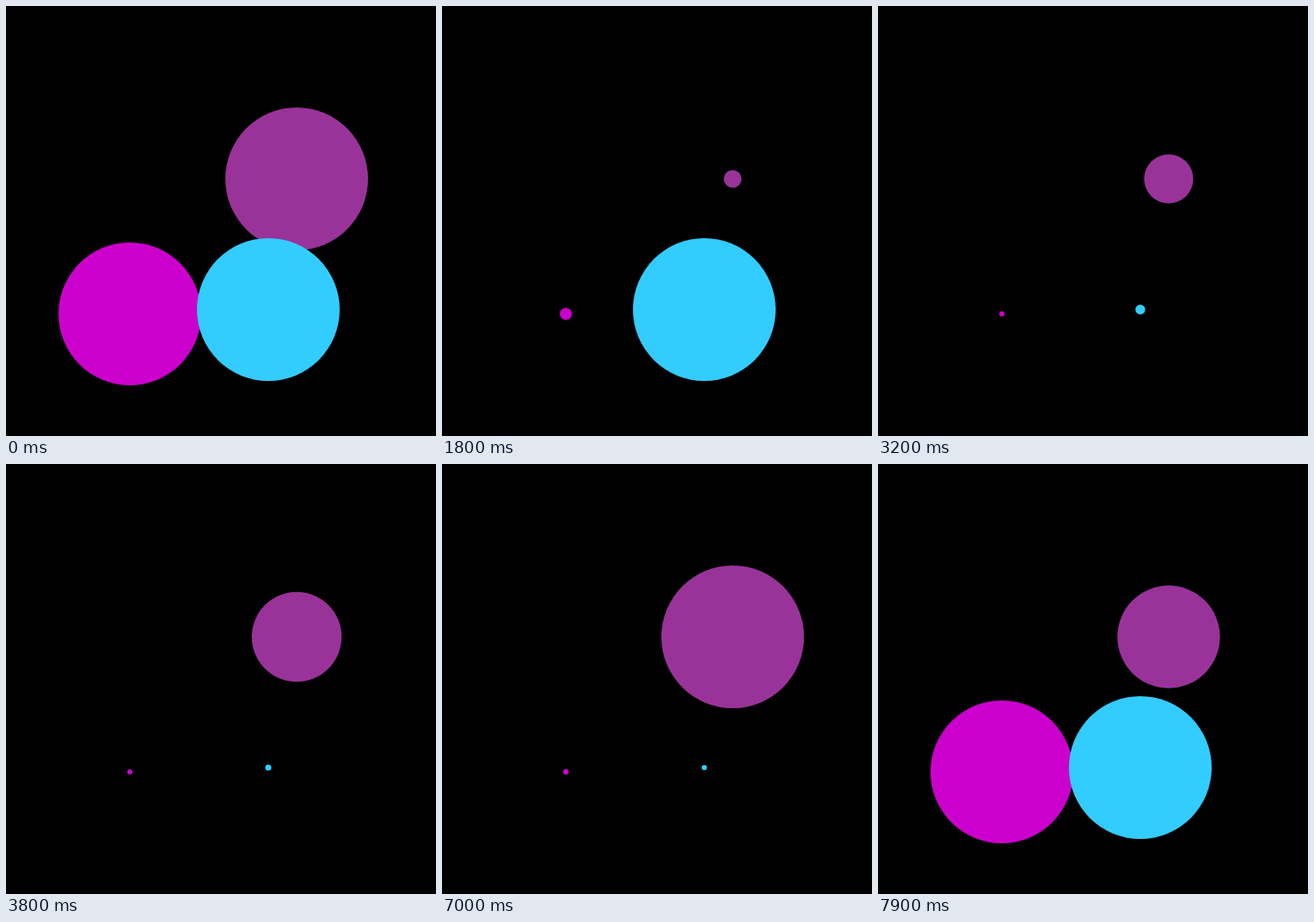
An HTML page with a canvas that plays this animation: 500 by 500 pixels, repeating every 8 s.

```html
<!DOCTYPE html>
<html lang="en">
<head>
<meta charset="utf-8">
<title>Three circles</title>
<style>
  html, body { margin: 0; width: 100%; height: 100%; overflow: hidden; background: #000; }
  canvas { display: block; width: 500px; height: 500px; }
</style>
</head>
<body>
<canvas id="stage" width="500" height="500"></canvas>
<script>
const ctx = document.getElementById('stage').getContext('2d');
const LOOP = 8000, STEP = 100;
const MIN = 3, MAX = 83;

// Times are in steps of 100 ms.
const decay = (t, start, rate) =>
  MIN + (MAX - MIN) * Math.exp(-rate * Math.max(0, t - start));

const swell = (t, start, length, from = MIN) => {
  const u = Math.min(1, Math.max(0, (t - start) / length));
  return from + (MAX - from) * u ** 3;
};

const circles = [
  {
    x: 338, y: 201, color: '#993399',
    radius: t => t < 60
      ? Math.max(decay(t, 5, 0.345), swell(t, 13, 30, 10))
      : decay(t, 78, 0.345)
  },
  {
    x: 144, y: 358, color: '#cc00cc',
    radius: t => t < 60 ? decay(t, 8.95, 0.33) : swell(t, 68.9, 8.6)
  },
  {
    x: 305, y: 353, color: '#33ccff',
    radius: t => t < 60 ? decay(t, 19.3, 0.265) : swell(t, 70.95, 8.05)
  }
];

function draw(ms) {
  const t = Math.floor((ms % LOOP) / STEP);
  ctx.fillStyle = '#000';
  ctx.fillRect(0, 0, 500, 500);
  for (const c of circles) {
    ctx.fillStyle = c.color;
    ctx.beginPath();
    ctx.arc(c.x, c.y, c.radius(t), 0, Math.PI * 2);
    ctx.fill();
  }
}

const began = performance.now();
function tick() {
  draw(performance.now() - began);
  requestAnimationFrame(tick);
}
tick();
</script>
</body>
</html>
```
